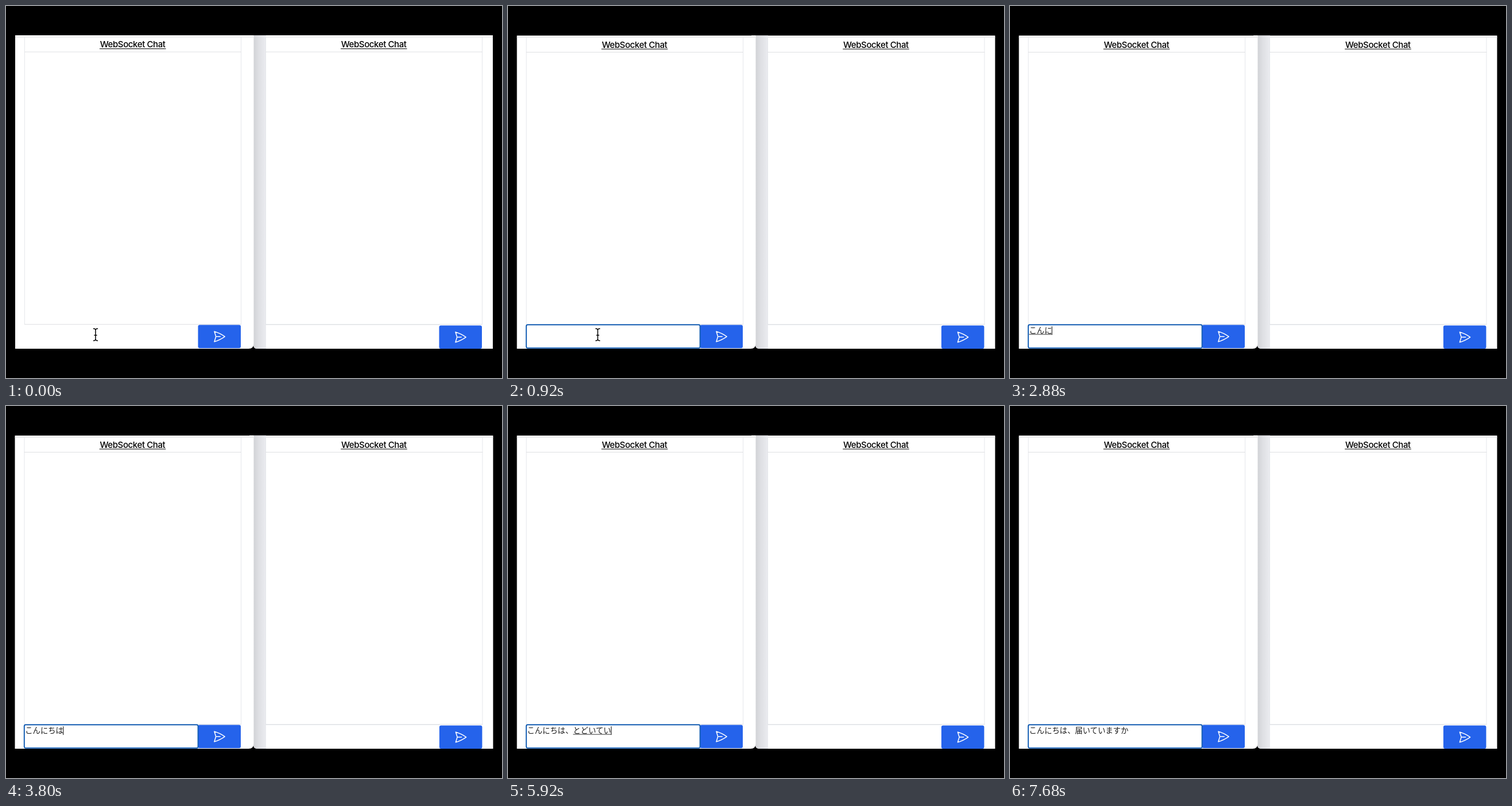
An HTML page for the animation above (8 s loop, 864 by 648 pixels).

```html
<!DOCTYPE html>
<html lang="ja">
<head>
<meta charset="utf-8">
<title>WebSocket Chat</title>
<style>
  html, body { margin: 0; width: 100%; height: 100%; overflow: hidden; background: #000; }
  svg { display: block; width: 864px; height: 648px; }
  .title { font: 500 15px Inter, sans-serif; letter-spacing: -.4px; text-anchor: middle; }
  .typed { font: 13.333px "Noto Sans CJK JP", "Noto Sans CJK", sans-serif; font-weight: 350; fill: #1c1c1c; }
  .rule { fill: none; stroke: #e5e7eb; }
</style>
</head>
<body>
<svg viewBox="0 0 864 648">
  <defs>
    <linearGradient id="shade">
      <stop offset="0" stop-color="#c6c8cb"/>
      <stop offset=".55" stop-color="#dedfe3"/>
      <stop offset="1" stop-color="#ebecf0"/>
    </linearGradient>
    <g id="panel">
      <path class="rule" d="M32.5 54V555M409.5 54V555"/>
      <path class="rule" d="M32 80H410M32 554.5H410" style="stroke:#dfe0e3"/>
      <text class="title" x="220.6" y="72.3">WebSocket Chat</text>
      <path d="M163 74.5H278.5" stroke="#000"/>
    </g>
    <g id="send">
      <rect x="334.5" y="555.5" width="74.5" height="40.5" rx="3" fill="#2563eb"/>
      <path transform="translate(359.7 563.8)" fill="none" stroke="#fff" stroke-width="1.5"
        stroke-linecap="round" stroke-linejoin="round"
        d="M6 12 3.27 3.13A59.77 59.77 0 0 1 21.49 12 59.77 59.77 0 0 1 3.27 20.88L6 12zm0 0h7.5"/>
    </g>
  </defs>

  <g id="stage">
    <!-- back window, shaded by the front one -->
    <path d="M424 51H848V597H439Q431 597 431 589Z" fill="#fff"/>
    <path d="M424 51H453V597H437Q431 597 431 591L424 589Z" fill="url(#shade)"/>
    <!-- front window -->
    <path d="M16 51H431.5V588Q431.5 597 422.5 597H16Z" fill="#fff"/>
    <path class="rule" d="M16 54H431M453 54H848" style="stroke:#dfe0e3"/>
    <use href="#panel"/>
    <use href="#panel" x="420"/>
    <path d="M453 555.2H755" class="rule"/>
    <use href="#send"/>
    <use href="#send" x="420" y="1"/>

    <rect id="focus" x="32.3" y="555.2" width="302.4" height="40.6" rx="2.5"
      fill="#fff" stroke="#1760b5" stroke-width="2"/>
    <rect id="highlight" y="557" height="16" fill="#b3d7ff"/>
    <text id="typed" class="typed" x="33.7" y="570"></text>
    <rect id="thick" y="571" height="2" fill="#111"/>
    <rect id="thin" y="571.5" height="1" fill="#333"/>
    <rect id="caret" y="558" width="1" height="15" fill="#000"/>
    <g id="pointer" fill="none" stroke-linecap="round">
      <path id="beam" stroke="#fff" stroke-width="3.4"
        d="M152.5 562Q156 562 156 565V580Q156 583 152.5 583M159.5 562Q156 562 156 565M159.5 583Q156 583 156 580M154 573.5H158"/>
      <use href="#beam"/>
      <path id="ink" stroke="#000" stroke-width="1.5"/>
    </g>
  </g>
</svg>
<script>
const LOOP = 8000, LEFT = 33.7, EM = 13.333;
const $ = id => document.getElementById(id);
$('ink').setAttribute('d', $('beam').getAttribute('d'));

// [start ms, committed text, text being composed, characters selected for conversion]
const HELLO = 'こんにちは', PREFIX = HELLO + '、';
const steps = [
  [0, '', ''],
  [1800, '', 'ｋ'], [2080, '', 'こ'], [2400, '', 'こｎ'], [2600, '', 'こん'],
  [2760, '', 'こんｎ'], [2880, '', 'こんに'],
  [3160, '', 'こんにｔ'], [3240, '', 'こんにち'], [3360, '', 'こんにちｈ'], [3480, '', HELLO],
  [3800, HELLO, ''], [4280, HELLO, '、'], [4480, PREFIX, ''],
  [4720, PREFIX, 'ｔ'], [4800, PREFIX, 'と'], [4920, PREFIX, 'とｄ'], [5040, PREFIX, 'とど'],
  [5200, PREFIX, 'とどい'],
  [5680, PREFIX, 'とどいｔ'], [5800, PREFIX, 'とどいて'], [5920, PREFIX, 'とどいてい'],
  [6080, PREFIX, 'とどいていｍ'], [6160, PREFIX, 'とどいていま'],
  [6240, PREFIX, 'とどいていまｓ'], [6320, PREFIX, 'とどいています'],
  [6520, PREFIX, 'とどいていますｋ'], [6640, PREFIX, 'とどいていますか'],
  [6880, PREFIX, '届いていますか', 3],
  [7200, PREFIX + '届いていますか', '']
];

const show = (id, on) => $(id).setAttribute('visibility', on ? 'visible' : 'hidden');

function span(id, from, count, inset = 0) {
  $(id).setAttribute('x', LEFT + from * EM + inset);
  $(id).setAttribute('width', Math.max(0, count * EM - inset - 1));
}

function draw(t) {
  const [, done, composing, selected = 0] = steps.findLast(step => t >= step[0]);
  const text = done + composing;

  // the picture settles by half a pixel just before the click
  $('stage').setAttribute('transform', t < 480 ? '' :
    'translate(432 597) scale(1.0012 .9992) translate(-432 -597)');
  $('pointer').setAttribute('transform', `translate(${t < 480 ? 0 : .7} 0)`);
  show('pointer', t < 1800);
  show('focus', t >= 680);

  $('typed').textContent = text;
  span('highlight', done.length, selected);
  span('thick', done.length, selected);
  span('thin', done.length + selected, composing.length - selected, selected ? 1 : 0);
  $('caret').setAttribute('x', LEFT + text.length * EM - .7);
  show('caret', text && !selected && t < 7680);
}

const start = performance.now();
(function frame() {
  draw((performance.now() - start) % LOOP);
  requestAnimationFrame(frame);
})();
</script>
</body>
</html>
```
